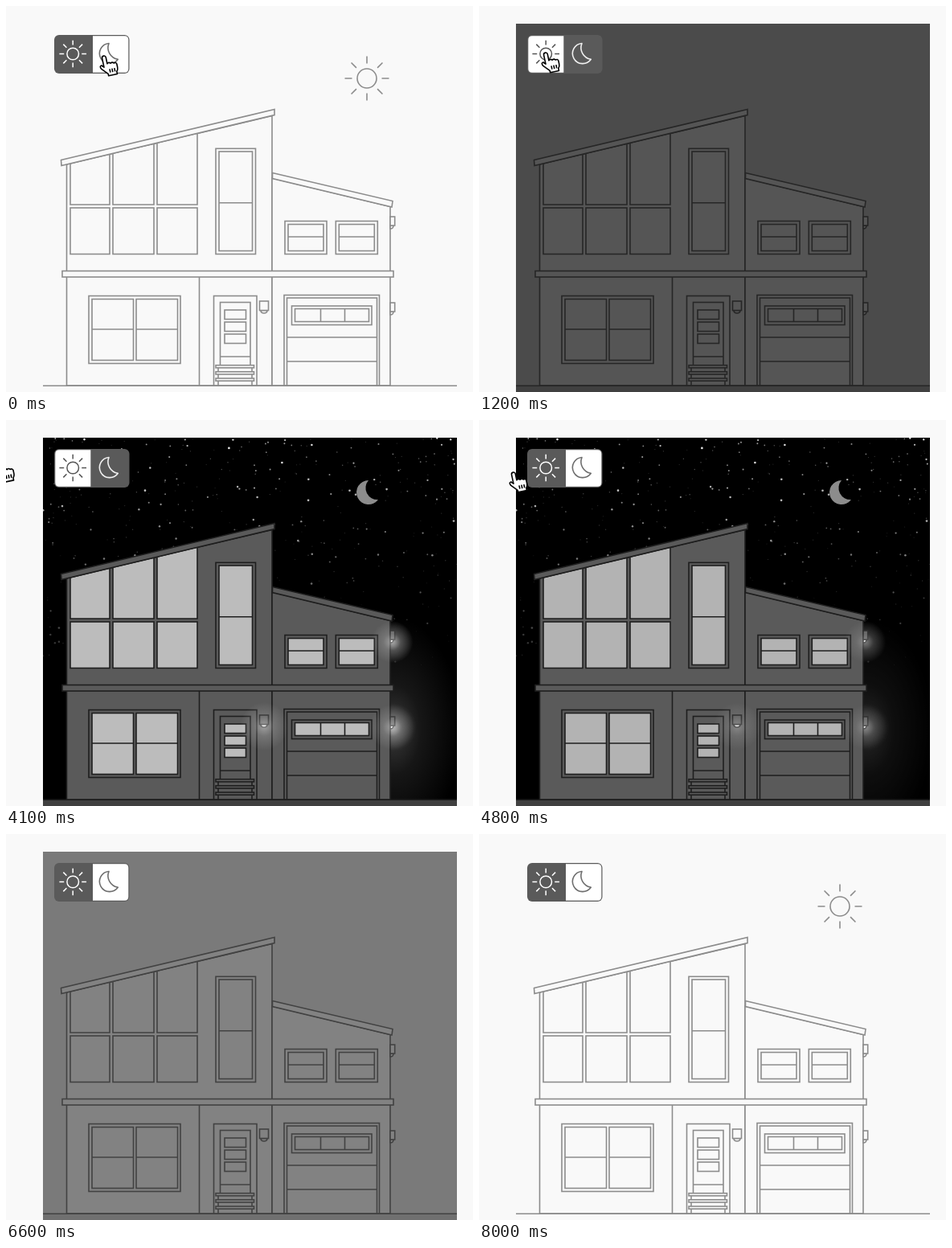
These frames come from a looping animation (581x480 px, 10 s). An HTML page:

```html
<!DOCTYPE html>
<html lang="en">
<head>
<meta charset="utf-8">
<title>Day and night house</title>
<style>
  html, body { margin: 0; width: 100%; height: 100%; overflow: hidden; background: #f9f9f9; }
  svg { display: block; width: 581px; height: 480px; }
  #house { stroke: var(--line); stroke-width: 1.6; fill: var(--wall); }
  #house .win { fill: var(--win); }
  #house .bulb { fill: var(--bulb); }
  .none { fill: none; }
</style>
</head>
<body>
<svg viewBox="0 0 581 480">
  <defs>
    <radialGradient id="halo">
      <stop offset="0" stop-color="#fff" stop-opacity=".42"/>
      <stop offset=".4" stop-color="#fff" stop-opacity=".16"/>
      <stop offset="1" stop-color="#fff" stop-opacity="0"/>
    </radialGradient>
    <clipPath id="scene"><path d="M46 22H561V480H46Z"/></clipPath>
  </defs>
  <rect id="sky" x="46" y="22" width="515" height="458"/>
  <g clip-path="url(#scene)">
    <g id="stars" fill="#fff"></g>
    <g class="glow" fill="url(#halo)">
      <ellipse cx="482" cy="385" rx="85" ry="140" opacity=".55"/>
      <circle cx="481" cy="276" r="26"/>
      <circle cx="481" cy="382" r="30"/>
    </g>
  </g>
  <rect id="ground" x="46" y="472" width="515" height="8"/>
  <g id="house"></g>
  <g class="glow" fill="url(#halo)" opacity=".6">
    <circle cx="321" cy="381" r="30"/>
    <circle cx="480" cy="276" r="26"/>
    <circle cx="480" cy="382" r="28"/>
  </g>
  <path id="moon" d="M2 -15A15 15 0 1 0 14 9A14.5 14.5 0 0 1 2 -15Z" fill="#8c8c8c"/>
  <g id="sun" class="none" stroke="#8c8c8c" stroke-width="1.6"></g>
  <g id="toggle">
    <rect x="60" y="36" width="93.5" height="48" rx="6" fill="#5a5a5a"/>
    <path id="dayHalf" d="M108 37.3H147.5Q152.3 37.3 152.3 42V78Q152.3 82.7 147.5 82.7H108Z" fill="#fff"/>
    <path id="nightHalf" d="M105.3 37.3H66Q61.3 37.3 61.3 42V78Q61.3 82.7 66 82.7H105.3Z" fill="#fff"/>
    <g id="sunIcon" class="none" stroke-width="1.5" transform="translate(83.2 59.5)"></g>
    <path id="moonIcon" class="none" stroke-width="1.6" stroke-linejoin="round"
      d="M128 46.5A12.6 12.6 0 1 0 139.3 66.3A14.5 14.5 0 0 1 128 46.5Z"/>
  </g>
  <g id="hand" fill="#fff" stroke="#000" stroke-width="1.6" stroke-linejoin="round">
    <path transform="rotate(-12)" d="M-2.4 2a2.4 2.4 0 0 1 4.8 0V10q2-2 4.2.2q2.4-1.5 4 .7q2.8-.8 3.4 1.8V17q0 3-2 5V25H1V22.5L-6 15q-2.2-4 1-4.3l2.6 2.8ZM4 17v4.5M7 17v4.5M10 17v4.5"/>
  </g>
</svg>
<script>
const $ = id => document.getElementById(id);
const LOOP = 10000;

// House drawing helpers, all in corner coordinates
const box = (x1, y1, x2, y2, cls = '') =>
  `<rect class="${cls}" x="${x1}" y="${y1}" width="${x2 - x1}" height="${y2 - y1}"/>`;
const shape = (d, cls = '') => `<path class="${cls}" d="${d}"/>`;
const eaveY = x => 198.5 - (x - 69) * 63 / 265;

function buildHouse() {
  const parts = [
    shape('M75.5 472V197L331 136.5V472Z'),
    shape('M331 472V214L478 249.5V472Z'),
    shape('M240.5 337V472', 'none')
  ];
  for (const [l, r] of [[80, 129], [133, 184], [188, 238]]) {
    parts.push(shape(`M${l} ${eaveY(l)}L${r} ${eaveY(r)}V247H${l}Z`, 'win'), box(l, 251, r, 308.5, 'win'));
  }
  parts.push(
    shape('M68.5 191.5L334 128.5V135.5L69 198.5Z'),
    shape('M331.5 207.5L481 242.5L480 250L331.5 214.5Z'),
    box(70, 329.5, 482, 337),
    box(261, 177.3, 310.5, 308.5), box(265, 181, 306.5, 304.5, 'win'), shape('M265 244.8H306.5')
  );
  for (const x of [347, 410.3]) {
    parts.push(box(x, 267.5, x + 52, 308.5), box(x + 4, 271.5, x + 48, 304.5, 'win'), shape(`M${x + 4} 287H${x + 48}`));
  }
  parts.push(box(103, 360.5, 217, 444.5));
  for (const x of [107, 162]) {
    parts.push(box(x, 364.5, x + 51.5, 440.5, 'win'), shape(`M${x} 402H${x + 51.5}`));
  }
  parts.push(box(258.5, 360.5, 312, 472), box(266.5, 368.5, 304, 447), shape('M266.5 436H304'));
  for (const y of [378, 393, 408]) parts.push(box(272, y, 298.5, y + 11.5, 'win'));
  parts.push(box(264, 447, 306, 472));
  for (const y of [446.7, 454.8, 463]) parts.push(box(261, y, 308.5, y + 3.2));
  parts.push(
    box(346, 359.5, 464.5, 472), box(349.5, 363, 461.5, 472),
    box(355.5, 373, 455, 396.5), box(359.5, 376.5, 451.5, 392.5, 'win'),
    shape('M391.5 376.5V392.5M421.5 376.5V392.5M349.5 412H461.5M349.5 442H461.5'),
    shape('M317 378.5Q317 382 321 382Q325 382 325 378.5Z', 'bulb'), box(315.5, 367, 326.5, 378.5)
  );
  for (const y of [262, 369]) {
    parts.push(shape(`M478 ${y + 11}H482Q482 ${y + 15} 478 ${y + 15}Z`, 'bulb'), box(478, y, 483.7, y + 11));
  }
  parts.push(shape('M46 472.3H561', 'none'));
  $('house').innerHTML = parts.join('');
}

function sunMarkup(r, inner, outer) {
  let d = '';
  for (let i = 0; i < 8; i++) {
    const c = Math.cos(i * Math.PI / 4), s = Math.sin(i * Math.PI / 4);
    d += `M${c * inner} ${s * inner}L${c * outer} ${s * outer}`;
  }
  return `<circle r="${r}"/><path d="${d}"/>`;
}

function buildStars() {
  let seed = 41, out = '';
  const rnd = () => (seed = seed * 16807 % 2147483647) / 2147483647;
  for (let i = 0; i < 520; i++) {
    const x = 46 + rnd() * 515, depth = Math.pow(rnd(), 1.25);
    const bright = rnd() ** 2.2, fade = 1 - depth * .85;
    out += `<circle cx="${x.toFixed(1)}" cy="${(22 + depth * 290).toFixed(1)}" r="${(.55 + bright * .8).toFixed(2)}"
      opacity="${((.2 + bright * .75) * fade).toFixed(2)}"/>`;
  }
  $('stars').innerHTML = out;
}

// Piecewise linear value from [time, value] pairs
function track(t, keys) {
  if (t <= keys[0][0]) return keys[0][1];
  for (let i = 1; i < keys.length; i++) {
    const [t0, a] = keys[i - 1], [t1, b] = keys[i];
    if (t < t1) return a + (b - a) * (t - t0) / (t1 - t0);
  }
  return keys[keys.length - 1][1];
}
const span = (t, a, b) => Math.min(1, Math.max(0, (t - a) / (b - a)));
const pulse = (t, a, b, c, d) => span(t, a, b) - span(t, c, d);
const backIn = p => p * p * (2.7 * p - 1.7);
const backOut = p => 1 - backIn(1 - p);
const gray = v => { v = Math.round(v); return `rgb(${v},${v},${v})`; };
const mix = (a, b, p) => a + (b - a) * p;

const skyKeys = [[735, 249], [1400, 0], [6100, 0], [6200, 43], [7000, 200], [7240, 249]];
const wallKeys = [[735, 249], [1200, 85], [1400, 90], [6100, 90], [6200, 80], [7000, 179], [7500, 249]];
const lineKeys = [[735, 140], [1200, 38], [1400, 30], [6200, 30], [7000, 102], [7500, 140]];
const groundKeys = [[700, 249], [1150, 64], [6100, 64], [6200, 70], [7000, 153], [7500, 249]];
const handX = [[100, 121.5], [500, 121.5], [1100, 82.5], [1550, 82.5], [1900, 16], [4050, -22], [4400, 78.5], [4580, 78.5], [4800, 42.5], [4900, 40]];
const handY = [[100, 62.5], [500, 62.5], [1100, 58.5], [1550, 58.5], [1900, 68], [4050, 52], [4400, 58.5], [4580, 58.5], [4800, 65.5]];

function render(t) {
  const wall = track(t, wallKeys);
  const lit = pulse(t, 2500, 2800, 4780, 5000);
  const bulb = pulse(t, 2600, 2800, 4780, 5000);
  const glow = pulse(t, 2800, 3100, 4700, 5000);
  const style = $('house').style;
  style.setProperty('--wall', gray(wall));
  style.setProperty('--line', gray(track(t, lineKeys)));
  style.setProperty('--win', gray(mix(wall, 188, lit)));
  style.setProperty('--bulb', gray(mix(wall, 240, bulb)));
  $('sky').setAttribute('fill', gray(track(t, skyKeys)));
  $('ground').setAttribute('fill', gray(track(t, groundKeys)));
  $('stars').setAttribute('opacity', pulse(t, 1550, 2400, 5250, 6000));
  document.querySelectorAll('.glow').forEach(g => { g.style.opacity = glow; });

  const sunDrop = t < 4000 ? backIn(span(t, 100, 800)) : 1 - backOut(span(t, 6980, 7680));
  $('sun').setAttribute('transform', `translate(449 ${90 + 143 * sunDrop})`);
  $('sun').setAttribute('opacity', 1 - pulse(t, 700, 800, 6920, 7010));
  const moonDrop = t < 4000 ? 1 - backOut(span(t, 1600, 2400)) : backIn(span(t, 5250, 6000));
  $('moon').setAttribute('transform', `translate(449 ${90 + 138 * moonDrop})`);
  $('moon').setAttribute('opacity', pulse(t, 1580, 1700, 5870, 6000));

  const night = pulse(t, 100, 200, 4580, 4680);
  $('dayHalf').setAttribute('opacity', 1 - night);
  $('nightHalf').setAttribute('opacity', night);
  $('sunIcon').setAttribute('stroke', gray(mix(255, 85, night)));
  $('moonIcon').setAttribute('stroke', gray(mix(110, 240, night)));

  const handOn = t < 1900 ? 1 - span(t, 1800, 1900) : pulse(t, 4040, 4060, 4810, 4900);
  $('hand').setAttribute('transform', `translate(${track(t, handX)} ${track(t, handY)})`);
  $('hand').setAttribute('opacity', handOn);
}

buildHouse();
buildStars();
$('sun').innerHTML = sunMarkup(12, 18.5, 27.5);
$('sunIcon').innerHTML = sunMarkup(7.3, 11, 16.8);

const start = performance.now();
function tick() {
  render((performance.now() - start) % LOOP);
  requestAnimationFrame(tick);
}
tick();
</script>
</body>
</html>
```
